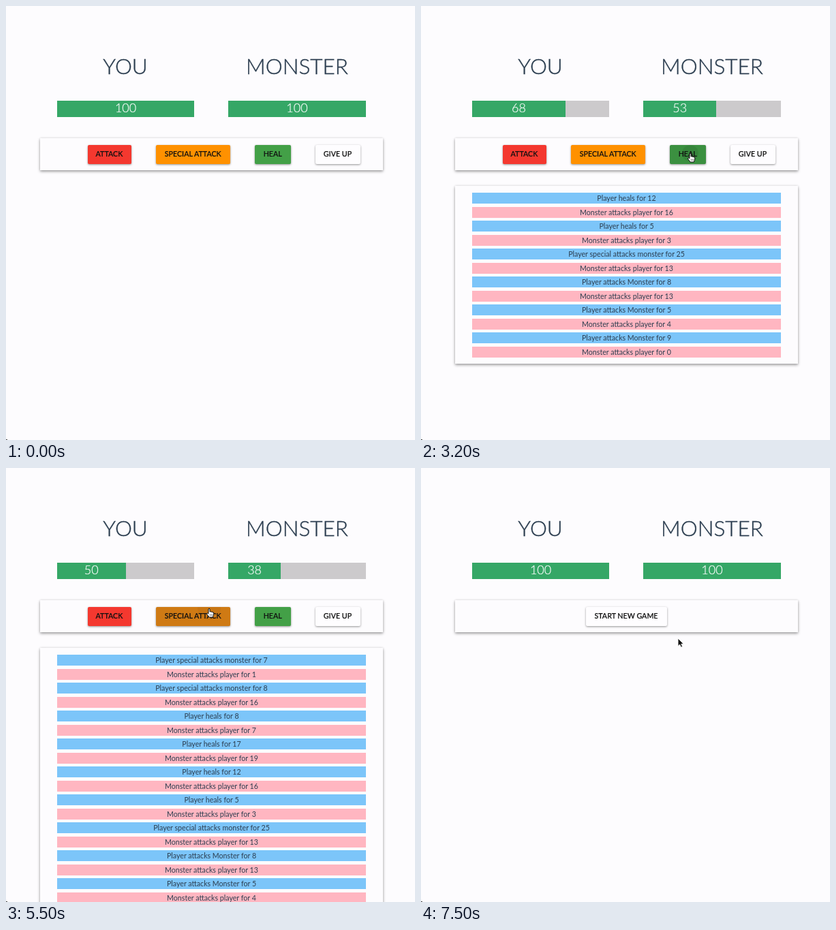
Recreate the animation shown at these times as an HTML page. Size 600 by 637 pixels, loop 7.6 s.

```html
<!DOCTYPE html>
<html lang="en">
<head>
<meta charset="utf-8">
<title>Monster duel</title>
<style>
html, body { margin: 0; width: 100%; height: 100%; overflow: hidden; background: #fdfcfe; }
#stage { position: relative; width: 600px; height: 637px; overflow: hidden; background: #fdfcfe; font-family: Lato, sans-serif; color: #2c3e50; }
#stage div, #stage svg { position: absolute; box-sizing: border-box; white-space: nowrap; text-align: center; }
.title { top: 68px; width: 201px; font-size: 31.5px; font-weight: 300; line-height: 40px; -webkit-text-stroke: .4px #2c3e50; }
.bar { top: 139px; width: 201.2px; height: 24px; background: #cccacc; }
.fill { left: 0; top: 0; height: 24px; background: #35a766; color: #fff; font-size: 18px; font-weight: 300; line-height: 21px; -webkit-text-stroke: .2px #fff; }
.panel { left: 50px; width: 502.5px; background: #fdfcfe; box-shadow: 0 2px 4px rgba(0,0,0,.36), 0 0 3px rgba(0,0,0,.12); }
.button { top: 204px; height: 27.5px; border-radius: 2px; overflow: hidden; box-shadow: 0 1px 3px rgba(0,0,0,.42); }
.button span { position: relative; font-size: 10.7px; font-weight: 500; line-height: 26px; color: #111; -webkit-text-stroke: .2px #111; }
.row { left: 25px; width: 453px; height: 16px; font-size: 10.65px; line-height: 15px; }
.ripple { border-radius: 50%; background: #000; }
#veil { inset: 0; background: rgba(0,0,0,.43); }
#dialog { left: 134px; top: 260px; width: 334px; height: 75px; border-radius: 4px; background: #fcfbfc; box-shadow: 0 3px 10px rgba(0,0,0,.5); font: 10.4px Inter, sans-serif; color: #333; }
#dialog div { line-height: 16px; }
</style>
</head>
<body>
<div id="stage"></div>
<script>
const LOOP = 7600, STEP = 100;
const ALERT = 5900, CLOSED = 6900;

// time, player move, amount, monster damage
const TURNS = [
  [1000, 'attack', 9, 0], [1400, 'attack', 5, 4], [1700, 'attack', 8, 13],
  [2300, 'special', 25, 13], [2800, 'heal', 5, 3], [3100, 'heal', 12, 16],
  [3500, 'heal', 17, 19], [3800, 'heal', 8, 7],
  [5000, 'special', 8, 16], [5300, 'special', 7, 1], [5700, 'special', 17, 7]
];
const PHRASES = {
  attack: 'Player attacks Monster for ',
  special: 'Player special attacks monster for ',
  heal: 'Player heals for '
};
// time, x, y of the pointer tip
const PATH = [
  [500, 260, 308], [900, 149, 216], [1900, 149, 216], [2100, 298, 207],
  [2400, 298, 207], [2700, 395, 216], [4200, 395, 216], [4700, 298, 206],
  [6400, 298, 206], [6700, 434, 320], [6900, 434, 320], [7400, 377, 250]
];
// name, label, left, width, colour, hover colour
const BUTTONS = [
  ['attack', 'ATTACK', 119.5, 64, '#f4382f', '#dc3b32'],
  ['special', 'SPECIAL ATTACK', 219.5, 109.5, '#ff9100', '#cf7a14'],
  ['heal', 'HEAL', 365, 52.5, '#43a047', '#3b9040'],
  ['quit', 'GIVE UP', 453.5, 66, '#fefdff', '#eeeeee']
];
const START = ['start', 'START NEW GAME', 241.5, 119, '#fefdff', '#eeeeee'];

const stage = document.getElementById('stage');

function add(parent, cls, style = {}, text = '') {
  const el = document.createElement('div');
  el.className = cls;
  el.textContent = text;
  Object.assign(el.style, style);
  parent.append(el);
  return el;
}
const px = n => n + 'px';
const show = (el, on) => { el.style.display = on ? '' : 'none'; };

add(stage, 'title', { left: '74.5px' }, 'YOU');
add(stage, 'title', { left: '326.5px' }, 'MONSTER');
const [youFill, monsterFill] = [75, 326.4].map(x =>
  add(add(stage, 'bar', { left: px(x) }), 'fill'));
add(stage, 'panel', { top: '194px', height: '47px' });

const buttons = [...BUTTONS, START].map(([name, label, x, w, color, hover]) => {
  const el = add(stage, 'button', { left: px(x), width: px(w) });
  const ripple = add(el, 'ripple');
  const span = document.createElement('span');
  span.textContent = label;
  el.append(span);
  return { name, x, w, color, hover, el, ripple };
});

const log = add(stage, 'panel', { top: '264px' });
const rows = TURNS.flatMap(([, move, amount, damage]) => [
  add(log, 'row', { background: '#ffb6c1' }, 'Monster attacks player for ' + damage),
  add(log, 'row', { background: '#7cc5f9' }, PHRASES[move] + amount)
]);

const veil = add(stage, '');
veil.id = 'veil';
const dialog = add(veil, '');
dialog.id = 'dialog';
add(dialog, '', { left: '18px', top: '16px' }, 'You win');
add(dialog, '', { left: 0, top: '45px', width: '100%', height: '1px', background: '#d2d1d2' });
add(dialog, '', { right: '19.5px', top: '53px', color: '#1683d0', fontWeight: 500 }, 'Close');
add(stage, '', { left: 0, top: '635.5px', width: '1.5px', height: '1.5px', background: '#444' });

stage.insertAdjacentHTML('beforeend', `
<svg id="arrow" width="14" height="18" viewBox="-1 -1 14 18">
  <path d="M0 0V11.5L2.6 9.1L4.5 13.2L6.6 12.3L4.8 8.3H8.2Z" fill="#111" stroke="#fff" stroke-width=".9"/>
</svg>
<svg id="hand" width="16" height="18" viewBox="-5 -1 16 18">
  <path d="M-1 1Q0 -.6 1.1 1V5Q2.2 4.2 3.1 5.3Q4.3 4.7 5 5.8Q6.7 5.3 6.8 7.2Q6.8 10.2 5.3 13H-.2Q-1.5 10.3-3.8 8Q-3.3 6.1-1 7.7Z" fill="#fff" stroke="#111" stroke-width="1"/>
  <path d="M1.2 8.5V11M3 8.5V11M4.7 8.5V11" stroke="#333" stroke-width=".6"/>
</svg>`);
const arrow = document.getElementById('arrow');
const hand = document.getElementById('hand');

function pointerAt(t) {
  const i = PATH.findIndex(p => p[0] > t);
  if (i < 0) return PATH[PATH.length - 1].slice(1);
  const [t0, x0, y0] = PATH[i - 1], [t1, x1, y1] = PATH[i];
  const k = (t - t0) / (t1 - t0), e = k * k * (3 - 2 * k);
  return [x0 + (x1 - x0) * e, y0 + (y1 - y0) * e];
}

function setHealth(fill, value) {
  fill.style.width = value + '%';
  fill.textContent = value;
}

function drawGame(t, over) {
  const done = over ? [] : TURNS.filter(turn => turn[0] <= t);
  let you = 100, monster = 100;
  for (const [, move, amount, damage] of done) {
    if (move === 'heal') you = Math.min(100, you + amount);
    else monster -= amount;
    you -= damage;
  }
  setHealth(youFill, you);
  setHealth(monsterFill, monster);

  const count = done.length * 2;
  show(log, count);
  log.style.height = px(15 + 20.5 * count);
  rows.forEach((row, i) => {
    show(row, i < count);
    row.style.top = px(10 + 20.5 * (count - 1 - i));
  });
  return done[done.length - 1];
}

function drawButtons(t, over, blocked, x, y, last) {
  for (const b of buttons) {
    show(b.el, (b.name === 'start') === over);
    const inside = !blocked && x > b.x && x < b.x + b.w && y > 204 && y < 231;
    b.el.style.background = inside ? b.hover : b.color;
    const age = last && last[1] === b.name ? t - last[0] : 999;
    show(b.ripple, inside && age < 300);
    const r = 7 + age * .05;
    Object.assign(b.ripple.style, {
      left: px(x - b.x - r), top: px(y - 204 - r),
      width: px(2 * r), height: px(2 * r), opacity: .12 * (1 - age / 300)
    });
  }
}

function draw(t) {
  const over = t >= CLOSED, blocked = t >= ALERT && !over;
  const visible = t >= PATH[0][0];
  const [x, y] = visible ? pointerAt(t) : [-50, -50];
  drawButtons(t, over, blocked, x, y, drawGame(t, over));
  show(veil, blocked);

  const pointing = t >= 2000 && t < ALERT;
  show(arrow, visible && !pointing);
  show(hand, visible && pointing);
  arrow.style.left = px(x - 1);
  hand.style.left = px(x - 5);
  arrow.style.top = hand.style.top = px(y - 1);
}

let shown = -1;
const begin = performance.now();
function tick() {
  const t = Math.floor((performance.now() - begin) % LOOP / STEP) * STEP;
  if (t !== shown) draw(shown = t);
  requestAnimationFrame(tick);
}
tick();
</script>
</body>
</html>
```
